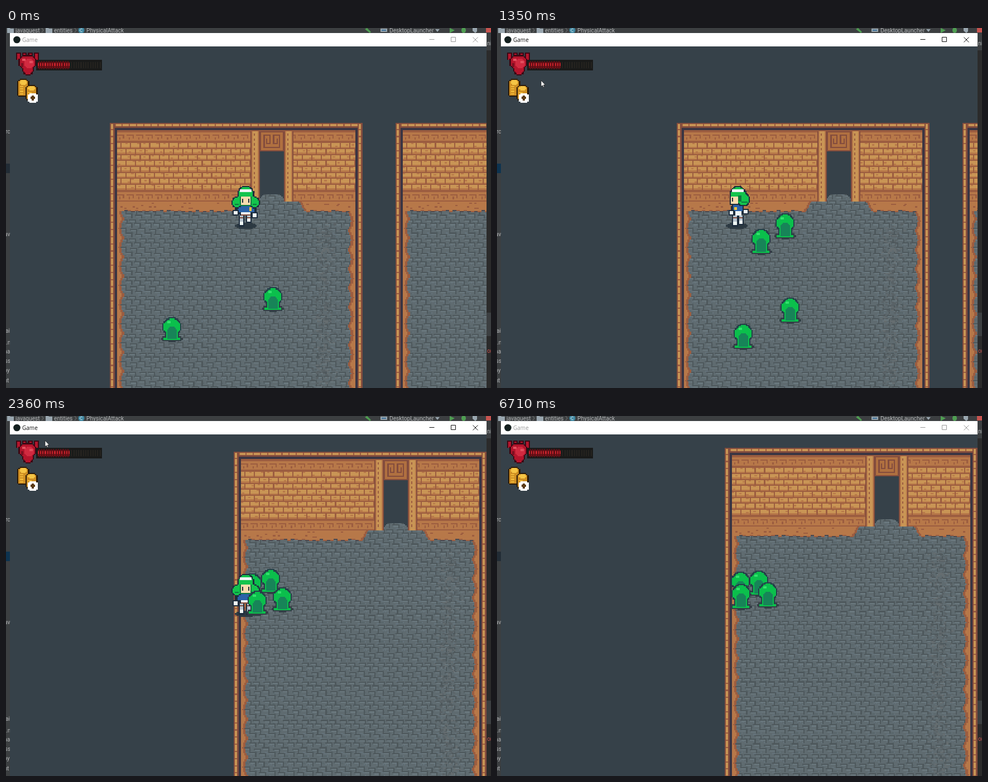
An HTML page with a canvas that plays this animation: 869 by 645 pixels, repeating every 6.78 s.

```html
<!DOCTYPE html>
<html lang="en">
<head>
<meta charset="utf-8">
<title>Game</title>
<style>
html, body { margin: 0; width: 100%; height: 100%; overflow: hidden; background: #3c3f41; }
svg, canvas { position: absolute; left: 0; top: 0; }
canvas { left: 7px; top: 33px; }
text { font: 10.2px Roboto, sans-serif; fill: #b4b6b8; }
.title { font: 10px "Open Sans", sans-serif; fill: #111; }
.controls { stroke: #111; fill: none; }
.row { fill: #0d3350; }
.idle .title { fill: #999; }
.idle .controls { stroke: #999; }
.idle .row { fill: #222c35; }
</style>
</head>
<body>
<svg id="chrome" width="869" height="645" viewBox="0 0 869 645">
  <rect width="869" height="645" fill="#3c3f41"/>
  <rect x="861" y="40" width="8" height="605" fill="#2b2b2b"/>
  <rect x="861" y="510" width="8" height="42" fill="#3c3f41"/>
  <rect class="row" y="243" width="7" height="17"/>
  <g fill="#9aa7b0">
    <path d="M2 0h5l1 1h6v8H2zM71 0h5l1 1h6v8H71z"/>
    <path d="M671 1h12v6h-12zM769 2h8l-4 5z"/>
    <path d="M836 0h8v6l-3 3-5-4z"/>
  </g>
  <path d="M673 3h8v2h-8z" fill="#3c6e96"/>
  <circle cx="135" cy="4" r="5.5" fill="#3e86a0"/>
  <path d="M137 2.5a2.5 2.5 0 1 0 0 3" fill="none" stroke="#d5e4ea"/>
  <path d="M64 0l3 4-3 4M123 0l3 4-3 4" fill="none" stroke="#777"/>
  <path d="M643 2l4-2 7 7-2 2zM795 0l9 4-9 5z" fill="#4f9e52"/>
  <ellipse cx="820" cy="4" rx="4" ry="5" fill="#4f9e52"/>
  <rect x="860" width="9" height="8" fill="#c75450"/>
  <text x="17" y="8">javaquest</text>
  <text x="86" y="8">entities</text>
  <text x="144" y="8">PhysicalAttack</text>
  <text x="687" y="8">DesktopLauncher</text>
  <text x="-1" y="189">rc</text>
  <text x="-3" y="373">av</text>
  <text x="-1" y="546">ai</text>
  <text x="0" y="567" font-weight="bold">.n</text>
  <text x="-4" y="583">na</text>
  <text x="-8" y="600">ess</text>
  <text x="-4" y="617">py</text>
  <text x="-6" y="635">int</text>
  <text x="862" y="31">ni</text>
  <text x="862" y="582" style="fill:#c75450">or</text>
  <rect x="7" y="9" width="854" height="25" fill="#fff"/>
  <circle cx="19.5" cy="21" r="6.3" fill="#14201f"/>
  <text class="title" x="29" y="25">Game</text>
  <path class="controls" d="M758.5 20.5h9M797.5 16.5h8v8h-8zM836.5 16.5l9 9M845.5 16.5l-9 9"/>
</svg>
<canvas id="game" width="854" height="612"></canvas>
<script>
const S = 2.135, LOOP = 6780, FRAME = 76.75;
const BG = '#364149', TAN = '#c99555', CLAY = '#b77849', BROWN = '#9c5d40', DARK = '#834c3d', INK = '#3a3543';
const chrome = document.getElementById('chrome');
const ctx = document.getElementById('game').getContext('2d');
ctx.imageSmoothingEnabled = false;

let seed = 7;
const rnd = n => (seed = seed * 16807 % 2147483647) % n;

// Small canvas in art pixels, with block drawing helpers
function sprite(w, h, paint) {
  const c = document.createElement('canvas');
  c.width = w; c.height = h;
  const g = c.getContext('2d');
  const rect = (x, y, w, h, col) => { g.fillStyle = col; g.fillRect(x, y, w, h); };
  const blob = (cx, cy, rx, ry, col) => {
    for (let y = Math.floor(cy - ry); y < cy + ry; y++) {
      const k = 1 - ((y + .5 - cy) / ry) ** 2;
      if (k <= 0) continue;
      const d = rx * Math.sqrt(k), l = Math.round(cx - d);
      rect(l, y, Math.round(cx + d) - l, 1, col);
    }
  };
  paint(rect, blob, g);
  return c;
}

// Repeating cobbles: a jittered running bond
const stones = sprite(16, 16, rect => {
  rect(0, 0, 16, 16, '#5f6b70');
  for (let i = 0; i < 30; i++) rect(rnd(16), rnd(16), 1 + rnd(3), 1, i % 2 ? '#59666b' : '#64727a');
  for (let i = 0; i < 8; i++) {
    const r = i >> 1, y = r * 4 + rnd(2), x = r % 2 * 4 + i % 2 * 8 + rnd(3);
    for (const left of [x, x - 16]) {
      rect(left + 1, y + 1, 4, 1, '#6a787e');
      rect(left, y, 5, 1, '#4e585c');
      rect(left + 5, y, 1, 4, '#4e585c');
    }
  }
});

const room = sprite(212, 292, (rect, blob, g) => {
  const H = 292, floor = g.createPattern(stones, 'repeat');
  const wave = y => Math.abs(Math.sin(y * Math.PI / 16)) * 2.5;

  // Back wall
  rect(0, 0, 212, H, CLAY);
  rect(6, 16, 200, 41, BROWN);
  for (let r = 0; r < 8; r++) {
    for (let x = 2 + r % 2 * 4; x < 206; x += 8) {
      const y = 17 + r * 5;
      rect(x, y, 7, 3, TAN);
      rect(x, y + 3, 7, 1, CLAY);
      rect(x + rnd(6), y + rnd(3), 2, 1, CLAY);
    }
  }
  for (const y of [7, 57]) {
    rect(6, y, 200, 9, CLAY);
    rect(6, y, 200, 1, BROWN);
    rect(6, y + 8, 200, 1, BROWN);
    for (let x = 6; x < 206; x += 8) {
      rect(x, y + 3, 6, 1, BROWN);
      rect(x + 5, y + 3, 1, 3, BROWN);
      rect(x + 2, y + 5, 1, 2, BROWN);
    }
  }
  for (let i = 0; i < 30; i++) rect(8 + rnd(196), 67 + rnd(5), 2, 1, BROWN);

  // Doorway
  rect(126, 7, 20, 17, '#b07040');
  g.strokeStyle = DARK;
  g.strokeRect(126.5, 7.5, 19, 16);
  for (const flip of [false, true]) {
    const bit = (x, y, w, h) => rect(flip ? 272 - x - w : x, y, w, h, DARK);
    bit(129, 10, 6, 1); bit(129, 10, 1, 10); bit(129, 20, 7, 1);
    bit(134, 10, 1, 7); bit(131, 13, 1, 5); bit(131, 17, 4, 1);
  }
  rect(126, 24, 20, 42, BG);
  for (const x of [118, 146]) {
    rect(x, 7, 8, 59, DARK);
    rect(x + 1, 7, 6, 59, CLAY);
    rect(x + 2, 7, 4, 59, TAN);
    for (let y = 9; y < 65; y += 4) rect(x + 3, y, 1, 2, BROWN);
  }

  // Floor, one row at a time: door step, fan below it, then the hall
  for (let y = 60; y < H; y++) {
    let l = 12 - Math.round(wave(y)), r = 200 + Math.round(wave(y + 6));
    if (y < 74) {
      l = y < 66 ? Math.max(126, 129 - (y - 60)) : 113 - Math.round((y - 66) * .6);
      r = 272 - l;
    }
    if (y > 65) rect(l - 2, y, r - l + 4, 1, BROWN);
    rect(l, y, r - l, 1, floor);
  }
  for (let x = 12; x < 200; x += 3) {
    if (x < 108 || x > 162) rect(x, 73 + rnd(2), 3, 1, x % 2 ? BROWN : '#4b484f');
  }
  for (let i = 0; i < 600; i++) rect(168 + rnd(12) + rnd(13), 84 + rnd(H - 84), 2, 1, i % 3 ? '#596266' : '#656d70');

  // Outer frame
  rect(0, 0, 212, 4, DARK);
  rect(1, 1, 210, 2, TAN);
  for (let x = 4; x < 210; x += 6) rect(x, 1, 1, 2, BROWN);
  rect(4, 4, 204, 2, INK);
  rect(6, 6, 200, 1, BROWN);
  for (const x of [0, 208]) {
    rect(x, 1, 4, H, DARK);
    rect(x + 1, 1, 2, H, TAN);
    for (let y = 5; y < H; y += 6) rect(x + 1, y, 2, 1, BROWN);
  }
  rect(4, 4, 2, H, INK);
  rect(206, 4, 2, H, INK);
});

const slimeArt = [0, 1, 2].map(k => sprite(20, 23, (rect, blob) => {
  const green = '#0bbf4c', deep = '#178458', edge = '#243f48';
  blob(10, 20, 9.4, 2.6, '#333f46');
  blob(10, 10 - k, 8, 7.9, edge);
  rect(4, 12, 12, 8, edge);
  blob(10, 10 - k, 7, 6.9, green);
  rect(5, 13 - k, 10, 4 + k, green);
  rect(3, 19, 14, 2, green);
  rect(5, 17, 10, 3, green);
  blob(10, 14 - k, 3.9, 4, deep);
  rect(6, 14 - k, 8, 6 + k, deep);
  rect(6, 5 - k, 3, 2, '#31e26c');
}));

const GREEN = '#13c44d', LEAF = '#0c7a40', WHITE = '#eef5f4', SKIN = '#f8dcae', BLUE = '#2a62a8', EDGE = '#1d2c3c';
const heroArt = (left, step) => sprite(24, 37, (rect, blob) => {
  const leg = (x, lift) => {
    rect(x - 1, 25, 5, 9 - lift, EDGE);
    rect(x, 25, 3, 5 - lift, '#b9c6d0');
    rect(x, 26, 3, 1, '#87503f');
    rect(x, 30 - lift, 3, 3, WHITE);
  };
  const hand = (x, y) => { rect(x, y, 5, 5, EDGE); rect(x + 1, y + 1, 3, 3, WHITE); };
  blob(12, 33.5, 9, 2.7, '#2c3942');
  if (left) {
    leg(12 + step * 2, step);
    leg(11 - step * 2, 0);
    blob(12.5, 19.5, 5.5, 6, EDGE);
    rect(9, 16, 8, 5, BLUE);
    rect(11, 21, 5, 4, WHITE);
    rect(10, 18, 2, 2, '#f2c23c');
    hand(8 - step * 3, 20);
    if (step) hand(17, 19);
    blob(13, 7, 7, 7, EDGE);
    blob(17.5, 11.5, 5.5, 6, EDGE);
    rect(6, 8, 8, 8, EDGE);
    blob(13, 7, 6, 6, GREEN);
    blob(17.5, 11.5, 4.5, 5, GREEN);
    rect(16, 13, 5, 1, LEAF);
    rect(13, 8, 3, 5, LEAF);
    rect(7, 9, 6, 6, SKIN);
    rect(8, 10, 1, 3, EDGE);
    rect(8, 3, 10, 2, WHITE);
  } else {
    leg(7, 0);
    leg(13, step * 3);
    blob(12, 20, 9, 5.5, EDGE);
    rect(5, 17, 14, 5, BLUE);
    rect(15, 18, 2, 3, '#f2c23c');
    rect(8, 22, 8, 3, WHITE);
    rect(8, 24, 8, 1, '#87503f');
    hand(1, 22 - step * 2);
    hand(18 - step, 22);
    blob(12, 7, 7.5, 7, EDGE);
    for (const x of [4.5, 19.5]) {
      blob(x, 14, 4.5, 5, EDGE);
      blob(x, 14, 3.5, 4, GREEN);
      rect(Math.floor(x) - 1, 15, 3, 1, LEAF);
    }
    blob(12, 7, 6.5, 6, GREEN);
    rect(5, 9, 14, 6, GREEN);
    rect(7, 9, 10, 8, LEAF);
    rect(8, 9, 8, 7, SKIN);
    rect(9, 11, 1, 3, EDGE);
    rect(14, 11, 1, 3, EDGE);
    rect(10, 8, 4, 1, GREEN);
    rect(7, 3, 10, 2, WHITE);
  }
});
const hero = [false, true].map(left => [0, 1].map(step => heroArt(left, step)));

const hud = sprite(76, 46, (rect, blob) => {
  rect(18, 7, 55, 9, '#191a19');
  rect(19, 9, 27, 5, '#741118');
  rect(19, 10, 27, 2, '#c4222b');
  rect(46, 9, 26, 5, '#25231f');
  for (let x = 20; x < 72; x += 2) rect(x, 8, 1, 7, x < 46 ? '#5a0e14' : '#191a19');

  // Heart: a body tapering to the lower right, with vessels on top
  const red = '#b3152c', wine = '#3b0914', rose = '#e2505f';
  for (const x of [1, 6, 11, 16]) { rect(x, 1, 4, 6, wine); rect(x + 1, 2, 2, 5, red); }
  for (const [rim, col] of [[1, wine], [0, red]]) {
    blob(10.5, 9, 7 + rim, 5.5 + rim, col);
    blob(11, 14, 4.5 + rim, 5 + rim, col);
  }
  blob(12, 10, 4, 4, '#d12a40');
  rect(6, 6, 3, 2, rose); rect(12, 8, 3, 2, rose);
  rect(5, 10, 2, 3, '#7d0f20');

  for (const [x, y, h] of [[2, 23, 10], [9, 28, 8]]) {
    for (const [rim, col] of [[1, '#2b1a08'], [0, '#cf8f22']]) {
      blob(x + 5, y + 3, 4 + rim, 2 + rim, col);
      rect(x + 1 - rim, y + 3, 8 + rim * 2, h, col);
      blob(x + 5, y + 3 + h, 4 + rim, 1.5 + rim, col);
    }
    blob(x + 5, y + 3, 3.5, 2, '#f6c545');
    for (let i = 6; i < h + 4; i += 2) rect(x + 2, y + i, 3, 1, '#f0b93a');
  }
  blob(15, 39, 4.5, 4.5, '#fff');
  blob(15, 39, 2, 2.2, '#5a3a12');
});

const ramp = (t, from, to) => Math.min(1, Math.max(0, (t - from) / (to - from)));

// Camera keeps the hero still; the room slides past instead
const roomX = t => 186 + 195 * ramp(t, 512, 1714) + 27 * ramp(t, 2050, 2220);
const roomY = t => 170 - 59 * ramp(t, 1480, 1850) - 54 * ramp(t, 2050, 2390);

// Slimes pursue the hero at a steady speed and end crowded at the wall
const DEATH = 2590, SPEED = .128, DT = 10;
const slimes = [
  { start: [292, 337], rest: [61, 265] },
  { start: [111, 391], rest: [28, 267] },
  { start: [220, 527], rest: [77, 286] },
  { start: [70, 569], rest: [29, 289] }
];
function chase({ start, rest }, t) {
  let [x, y] = start;
  for (let s = 0; s < Math.min(t, DEATH); s += DT) {
    const dx = 430 - roomX(s) - x, dy = 350 - roomY(s) - y;
    const k = SPEED * DT / Math.max(10, Math.hypot(dx, dy));
    x += dx * k;
    y += dy * k;
  }
  const k = ramp(t, 1970, DEATH);
  return [x + (rest[0] - x) * k, y + (rest[1] - y) * k];
}

// Mouse stops: time, x, y and how widely it circles there
const stops = [[300, 610, 560, 0], [660, 589, 295, 0], [1350, 79, 94, 0], [1600, 80, 88, 1.1], [2900, 80, 88, 1.1],
  [3445, 570, 440, 0], [3520, 535, 478, 0], [4000, 95, 92, 1], [5000, 110, 92, .7], [5290, 234, 93, 0],
  [5600, 234, 141, 0], [5905, 570, 503, 0]];
function pointer(t) {
  const i = Math.max(1, stops.findIndex(s => s[0] > t));
  const a = t < stops.at(-1)[0] ? stops[i - 1] : stops.at(-1), b = stops[i];
  const k = ramp(t, a[0], b[0]), turn = (t - 1970) / 99 + .75;
  const [x, y, r] = [1, 2, 3].map(j => a[j] + (b[j] - a[j]) * k);
  return a === stops.at(-1) ? a.slice(1, 3) : [x + 60 * r * Math.cos(turn), y + 40 * r * Math.sin(turn)];
}
const arrow = new Path2D('M0 0v11l2.500-2.300 1.500 3.500 1.700-.7-1.500-3.500h3.300z');

const put = (c, x, y) => ctx.drawImage(c, Math.round(x), Math.round(y), c.width * S, c.height * S);

function draw(t) {
  const x = roomX(t), y = roomY(t);
  ctx.setTransform(1, 0, 0, 1, -7, -33);
  ctx.fillStyle = BG;
  ctx.fillRect(7, 33, 854, 612);
  put(room, x, y);
  put(room, x + 512.4, y);

  const bob = Math.floor((t + 60) % 590 / 197);
  const actors = slimes.map(slime => {
    const [sx, sy] = chase(slime, t);
    return [sy + y, () => put(slimeArt[bob], sx + x - 10 * S, sy + y - 22 * S)];
  });
  if (t < DEATH) {
    const left = t > 512 && t < 1714;
    const walking = left || t < 70 || t > 2050;
    const step = walking && Math.floor(t / 150) % 2 === 0 ? 1 : 0;
    actors.push([355, () => put(hero[+left][step], 430 - 12 * S, 283)]);
  }
  actors.sort((a, b) => a[0] - b[0]).forEach(a => a[1]());
  put(hud, 16, 42);

  if (t >= 300 && t < 5950) {
    ctx.translate(...pointer(t).map(Math.round));
    ctx.fillStyle = '#fff';
    ctx.fill(arrow);
    ctx.strokeStyle = '#111';
    ctx.lineWidth = .7;
    ctx.stroke(arrow);
  }
}

// The picture refreshes in even ticks
let shown = -1;
function loop() {
  const now = performance.now() % LOOP;
  const t = Math.max(0, 45 + FRAME * Math.floor((now - 45) / FRAME));
  if (t !== shown) draw(shown = t);
  chrome.classList.toggle('idle', now < 70 || now >= 6705);
  requestAnimationFrame(loop);
}
loop();
</script>
</body>
</html>
```
